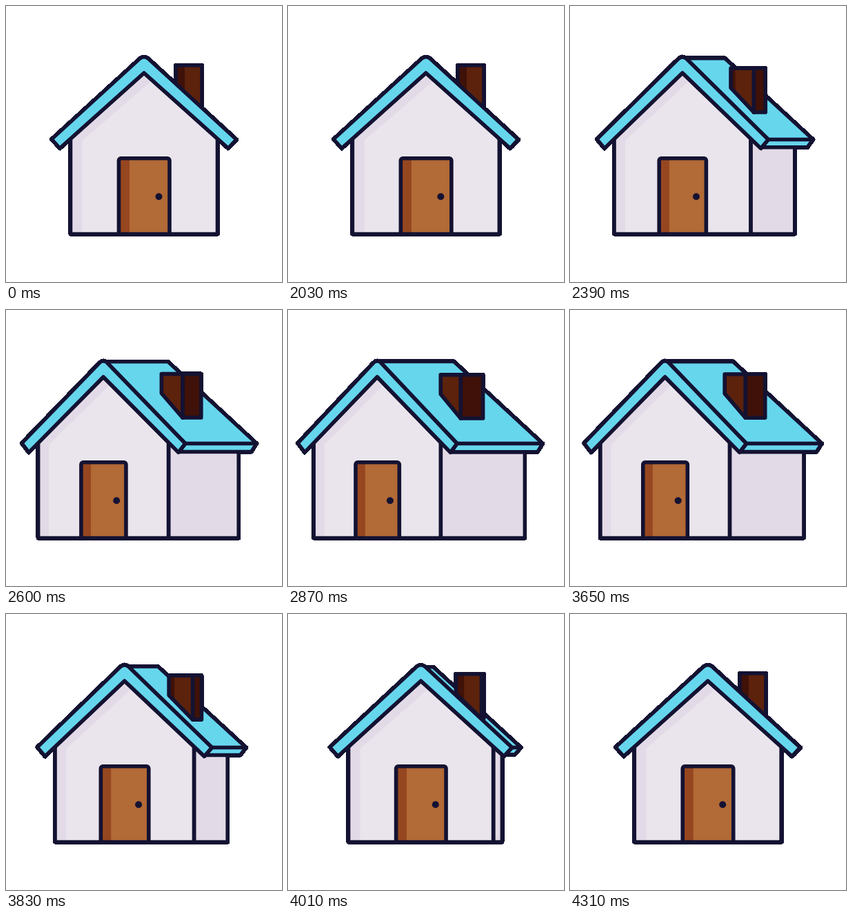
Recreate the animation shown at these times as an HTML page with a canvas. Size 400 by 400 pixels, loop 4340 ms.

```html
<!DOCTYPE html>
<html lang="en">
<head>
<meta charset="utf-8">
<title>Turning house</title>
<style>
  html, body { margin: 0; width: 100%; height: 100%; overflow: hidden; background: #fff; }
  canvas { display: block; width: 400px; height: 400px; }
</style>
</head>
<body>
<canvas id="stage" width="400" height="400"></canvas>
<script>
const ctx = document.getElementById('stage').getContext('2d', { willReadFrequently: true });
const INK = '#141232', ROOF = '#66d6ed', WALL = '#eae5ec', SHADE = '#e2dae6';
const DOOR = '#b26a36', DOOR_SHADE = '#964720', BRICK = '#5c220c', BRICK_SHADE = '#3f1108';
const LOOP = 4340, START = 2030, STEP = 30;

// Cubic Bezier easing with flat ends: control points (a, 0) and (b, 1)
function ease(x, a, b) {
  let lo = 0, hi = 1;
  for (let i = 0; i < 30; i++) {
    const u = (lo + hi) / 2, v = 1 - u;
    if (3 * a * u * v * v + 3 * b * u * u * v + u * u * u < x) lo = u; else hi = u;
  }
  return lo * lo * (3 - 2 * lo);
}

// 0 = seen from the front, 1 = turned to show the side
function turnAt(ms) {
  if (ms < START) return 0;
  const t = START + Math.floor((ms - START) / STEP) * STEP;
  return t < 3200 ? ease((t - 2000) / 1200, 0.345, 0.19)
                  : 1 - ease((t - 3200) / 1200, 0.77, 0.22);
}

function paint(fill, stroke) {
  if (fill) { ctx.fillStyle = fill; ctx.fill(); }
  if (stroke) ctx.stroke();
}

function poly(fill, stroke, ...points) {
  ctx.beginPath();
  points.forEach(([x, y]) => ctx.lineTo(x, y));
  ctx.closePath();
  paint(fill, stroke);
}

// The silhouette has a hard edge: every pixel is either clear or opaque
function hardenEdge() {
  const image = ctx.getImageData(0, 0, 400, 400), px = image.data;
  for (let i = 3; i < px.length; i += 4) px[i] = px[i] > 40 ? 255 : 0;
  ctx.putImageData(image, 0, 0);
}

function draw(p) {
  const mix = (from, to) => from + (to - from) * p;

  ctx.clearRect(0, 0, 400, 400);
  ctx.lineWidth = 5.6;
  ctx.lineJoin = ctx.lineCap = 'round';
  ctx.strokeStyle = INK;

  const ground = 330.5, apex = mix(200, 125.7);
  const left = mix(93.5, 34.4), right = mix(306.5, 217), back = mix(306.5, 345.2);
  const eaveL = [mix(66, 11.4), 193], footL = [mix(78, 21.5), 206.4];
  const eaveR = [mix(334, 240.5), 193.5], footR = [mix(322, 231), 206.4];
  const ridge = mix(77, 74.2), gutter = mix(203.5, 206);
  const eaveBack = [mix(334, 371), 193.5], footBack = [mix(325, 363.5), gutter];

  // Walls
  poly(SHADE, true, [right, 190], [back, 190], [back, ground], [right, ground]);
  const front = [[left, ground], [left, 192], [apex, 97], [right, 192], [right, ground]];
  poly(SHADE, false, ...front);
  const lit = mix(110.5, 49.5);
  poly(WALL, false, [lit, ground], [lit, 195], [mix(212.5, 136), 107], [right, 192], [right, ground]);
  poly(null, true, ...front);

  // Door
  const doorL = mix(163.5, 94.7), doorR = mix(237, 157.5), doorLit = mix(179, 108.5);
  ctx.beginPath();
  ctx.roundRect(doorL, 220.8, doorR - doorL, ground - 220.8, [3, 3, 0, 0]);
  paint(DOOR, false);
  ctx.fillStyle = DOOR_SHADE;
  ctx.fillRect(doorL + 1, 222, doorLit - doorL - 1, ground - 222);
  ctx.stroke();
  ctx.beginPath();
  ctx.arc(mix(221.5, 144.2), 276.3, 5, 0, 7);
  paint(INK, false);

  // Side of the roof
  poly(ROOF, true, [apex, ridge], [mix(207, 242), ridge], eaveBack, footBack, [footR[0] + 1, gutter], eaveR);
  poly(null, true, eaveR, eaveBack);

  // Chimney
  const chL = mix(246, 220), chMid = mix(284, 248.5), chR = mix(284, 282.5);
  const chTop = mix(86, 94.3), chLow = mix(150.5, 157.3), chLeftLow = mix(115, 122.3);
  const strip = 13 * (1 - p);
  const stripLow = chLeftLow + (chLow - chLeftLow) * strip / (chMid - chL);
  const face = [[chL, chTop], [chMid, chTop], [chMid, chLow], [chL, chLeftLow]];
  poly(BRICK_SHADE, true, [chMid, chTop], [chR, chTop], [chR, chLow], [chMid, chLow]);
  poly(BRICK, false, ...face);
  poly(BRICK_SHADE, false, [chL, chTop], [chL + strip, chTop], [chL + strip, stripLow], [chL, chLeftLow]);
  poly(null, true, ...face);

  // Front edge of the roof
  const bend = mix(6, 5);
  ctx.beginPath();
  ctx.moveTo(...footL);
  ctx.lineTo(...eaveL);
  ctx.lineTo(apex - bend, 76);
  ctx.quadraticCurveTo(apex, 71.5, apex + bend, 76);
  ctx.lineTo(...eaveR);
  ctx.lineTo(...footR);
  ctx.lineTo(apex, 97);
  ctx.closePath();
  paint(ROOF, true);

  hardenEdge();
}

const begin = performance.now();
function tick() {
  draw(turnAt((performance.now() - begin) % LOOP));
  requestAnimationFrame(tick);
}
tick();
</script>
</body>
</html>
```
